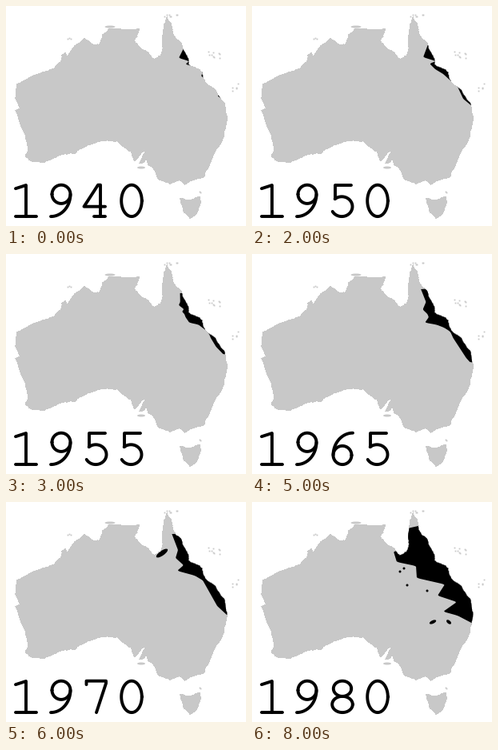
Animation of 300 by 275 pixels, one loop 9.5 s. Source, as a matplotlib script:

```python
import numpy as np
import matplotlib.pyplot as plt
from matplotlib.animation import FuncAnimation
from matplotlib.patches import Ellipse, Polygon

W, H, DPI = 300, 275, 100
PX = 72 / DPI
GREY = "#c8c8c8"
SEA = 300
rng = np.random.default_rng(4)

fig = plt.figure(figsize=(W / DPI, H / DPI), dpi=DPI, facecolor="white")
ax = fig.add_axes([0, 0, 1, 1])
ax.set_xlim(0, W)
ax.set_ylim(H, 0)
ax.axis("off")


# ---- map ----
def rugged(pts, rounds=3, amp=0.06):
    """Closed outline roughened by midpoint displacement."""
    p = np.array(pts, float)
    for _ in range(rounds):
        q = np.roll(p, -1, axis=0)
        normal = (q - p)[:, ::-1] * [-1, 1]
        mid = (p + q) / 2 + normal * rng.uniform(-amp, amp, (len(p), 1))
        p = np.stack([p, mid], 1).reshape(-1, 2)
    return p + rng.uniform(-0.4, 0.4, p.shape)


def land(pts):
    return ax.add_patch(Polygon(rugged(pts), fc=GREY, ec="none", aa=False))


def blob(x, y, w, h, angle=0, color="k"):
    return ax.add_patch(Ellipse((x, y), w, h, angle=angle, fc=color, ec="none"))


east = [(201, 14), (207, 23), (209, 36), (219, 46), (221, 53), (228, 66),
        (228, 73), (241, 79), (245, 83), (250, 97), (262, 105), (274, 123),
        (276, 143), (270, 168), (254, 199), (247, 214)]
south = [(238, 216), (224, 223), (217, 217), (205, 222), (191, 217),
         (183, 201), (178, 199), (175, 188), (173, 195), (167, 197),
         (172, 186), (176, 179), (161, 194), (156, 182), (139, 169),
         (120, 168), (100, 175), (86, 184), (67, 186), (47, 196),
         (31, 194), (24, 187)]
west = [(28, 181), (25, 163), (12, 130), (17, 128), (12, 115), (14, 98),
        (29, 90), (60, 78), (70, 68), (70, 62), (74, 58), (77, 63),
        (86, 50), (98, 41)]
north = [(108, 48), (117, 48), (121, 36), (130, 28), (146, 30), (167, 29),
         (160, 44), (176, 57), (185, 67), (193, 62), (196, 55), (195, 45),
         (197, 29)]
main = land(east + south + west + north)
land([(218, 240), (228, 243), (242, 238), (243, 247), (236, 262),
      (230, 265), (222, 257)])

for x, y, w, h in [(169, 202, 10, 3), (130, 26, 13, 3), (163, 38, 3, 3)]:
    blob(x, y, w, h, color=GREY)

# islets scattered around reef centres: x, y, spread, count
for x, y, dx, dy, n in [(205, 12, 9, 2, 7), (258, 62, 9, 5, 9),
                        (285, 102, 5, 5, 5), (79, 38, 2, 5, 3),
                        (243, 234, 2, 2, 2)]:
    ax.plot(x + rng.uniform(-dx, dx, n), y + rng.uniform(-dy, dy, n), "s",
            color=GREY, ms=1.8 * PX, mew=0)

# ---- inland front: land seaward of it is taken ----
ys = np.arange(20, 165, 0.5)


def front(*knots):
    """Smooth x position of the front along y; open sea past both ends."""
    x, y = np.array(knots, float).T
    line = np.interp(ys, y, x, left=SEA, right=SEA)
    return np.convolve(np.pad(line, 2, mode="edge"), np.ones(5) / 5, "valid")


fronts = {
    1940: front((223, 51), (216, 65), (229, 69), (224, 73), (247, 78),
                (244, 88), (252, 92), (270, 109), (264, 112), (277, 122)),
    1950: front((220, 48), (214, 64), (230, 69), (222, 72), (229, 79),
                (239, 85), (250, 95), (257, 101), (264, 116), (276, 126)),
    1960: front((213, 43), (220, 60), (215, 69), (221, 75), (218, 86),
                (238, 88), (250, 96), (253, 105), (276, 136)),
    1970: front((207, 39), (215, 60), (212, 70), (222, 79), (214, 86),
                (236, 92), (246, 98), (264, 130), (277, 142)),
    1975: front((211, 40), (190, 57), (177, 62), (181, 74), (211, 76),
                (229, 100), (245, 102), (237, 121), (258, 128), (249, 138),
                (278, 154)),
    1980: front((212, 29), (190, 34), (190, 58), (177, 62), (181, 75),
                (205, 80), (206, 95), (241, 103), (232, 117), (256, 125),
                (239, 137), (257, 142), (278, 153)),
}
for year in (1945, 1955, 1965):
    fronts[year] = (fronts[year - 5] + fronts[year + 5]) / 2

far = [(x, y, 3, 3) for x, y in
       [(190, 83), (185, 87), (194, 104), (219, 111)]]
near = [(x, y, 3, 3) for x, y in
        [(208, 91), (224, 149), (246, 147), (250, 150), (254, 153)]]
outposts = {
    1970: [(195, 64, 17, 6, -35)],
    1975: far + near,
    1980: far + [(226, 150, 9, 4, -25), (246, 150, 7, 4, 40)],
}

# ---- year digits, drawn as pen strokes ----
TOP, TALL, PITCH, MID = 223.7, 39.4, 44, 25


def arc(cx, cy, rx, ry, start=0, end=360):
    a = np.radians(np.linspace(start, end, 60))
    return np.c_[cx + rx * np.cos(a), cy + ry * np.sin(a)]


bowl = arc(0, TALL - 11.6, 11.5, 11.6)
tail = arc(13, TALL - 11.6, 24.5, TALL - 11.6, 180, 270)
glyphs = {
    "0": [arc(0, TALL / 2, 12.8, TALL / 2)],
    "1": [[(-13, 4.5), (0, 0.3), (0, TALL)], [(-13, TALL), (13, TALL)]],
    "4": [[(11, 27), (-15.5, 27), (2, 0), (5, 0), (5, TALL)],
          [(-3, TALL), (11, TALL)]],
    "5": [[(10.5, 0), (-9.5, 0), (-9.5, 17)],
          arc(-0.8, TALL - 12.4, 13.3, 12.4, -130, 150)],
    "6": [bowl, tail],
    "7": [[(-12.5, 4.5), (-12.5, 0), (12, 0), (12, 3), (0, TALL)]],
    "8": [arc(0, 9.6, 11.2, 9.6), arc(0, TALL - 10.1, 12.8, 10.1)],
    "9": [[0, TALL] - bowl, [0, TALL] - tail],
}


def draw_digit(ch, col):
    return [ax.plot(*(np.array(s) + [MID + col * PITCH, TOP]).T, color="k",
                    lw=3.9 * PX, solid_capstyle="round",
                    solid_joinstyle="round")[0] for s in glyphs[ch]]


def draw_stage(year):
    arts = [ax.fill_betweenx(ys, fronts[year], SEA, fc="k", ec="none")]
    arts += [blob(*spot) for spot in outposts.get(year, [])]
    for art in arts:
        art.set_clip_path(main)
    for col, ch in enumerate(str(year)):
        arts += draw_digit(ch, col)
    return arts


layers = [draw_stage(year) for year in sorted(fronts)]


def update(k):
    now = min(k // 2, len(layers) - 1)
    for i, arts in enumerate(layers):
        for art in arts:
            art.set_visible(i == now)
    return []


update(0)
anim = FuncAnimation(fig, update, frames=19, interval=500, repeat=True,
                     repeat_delay=0, blit=False)
plt.show()
```
